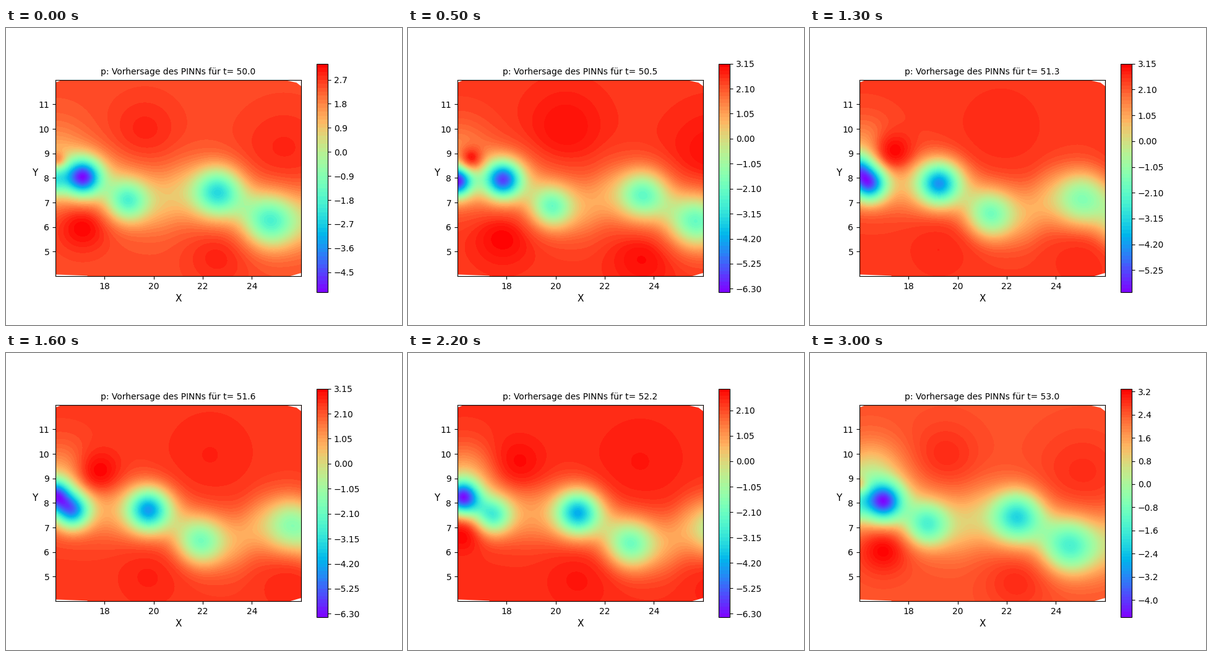
A matplotlib script for the animation above (3100 ms loop, 640 by 480 pixels).

```python
import matplotlib.pyplot as plt
import numpy as np
from matplotlib.animation import FuncAnimation
from matplotlib.patches import Polygon

FRAMES, STEP_MS = 31, 100
PERIOD = 3.1   # time between two vortices of the same row
LAG = 1.97     # delay of the lower row behind the upper one
BASE, KNEE = 2.45, 2.4

X, Y = np.meshgrid(np.linspace(16, 26, 220), np.linspace(4, 12, 176))

CORNERS = [
    [(16, 12), (16.24, 12), (16.14, 11.94), (16, 11.89)],
    [(25.3, 12), (25.82, 11.88), (26, 11.74), (26, 12)],
    [(16, 4), (16, 4.07), (17.3, 4.02), (17.3, 4)],
    [(25.55, 4), (26, 4.13), (26, 4)],
]


def step(s, mid, width):
    """Smooth rise from 0 to 1 around mid."""
    return 1 / (1 + np.exp((mid - s) / width))


def bell(d, width):
    return np.exp(-(d / width) ** 2)


def drift(s):
    """Slow start at the inlet, then a steady speed of 1.9."""
    return 15.76 + 1.14 * np.logaddexp(0, (s - 2.6) / .6)


# Each part is a tuple: x, y, height, size. The age tells how far it has moved.

def upper_vortex(age):
    height = -6.5 * step(age, 1.2, .15) * (1 - .62 * step(age, 5.7, .6))
    return drift(age), 8.66 - .2 * age, height, .38 + .045 * age


def lower_vortex(age):
    height = -7.2 * step(age, 1.2, .15) * (1 - .58 * step(age, 2.95, .25))
    y = 7.95 - 1.75 * step(age, 4.2, .85)
    return drift(age), y, height, .38 + .045 * age


def upper_high(age):
    x = 16.1 + .8 * age + .11 * age ** 2
    y = 9.4 - .7 * np.cos(.85 * (age - .2))
    return x, y, .35 + 2.1 * bell(age - .8, 1.1), .24 + .24 * np.clip(age, 0, 4.5)


def lower_high(age):
    y = 7.45 - 2.6 * step(age, 3.1, .7)
    height = step(age, 1.9, .15) * (.4 + 1.1 * bell(age - 2.3, .8))
    return drift(age), y, height, .1 + .2 * np.clip(age, 1, 4)


def inlet_low(t):
    return 16 + .15 * t, 9.2, -.7 - .3 * t, .9


def bump(x, y, height, size):
    return height * np.exp(-((X - x) ** 2 + (Y - y) ** 2) / (2 * size ** 2))


def wake(vortices):
    """Trough that meanders through the vortex centres."""
    total, weight = 0, 1e-9
    for x, y, height, _ in vortices:
        w = abs(height) * np.exp(-(X - x) ** 2 / 2)
        total, weight = total + w * y, weight + w
    return -1.5 * bell(Y - total / weight, 1.25)


def limits(t):
    """Deepest and highest pressure at time t."""
    lo = np.interp(t, [0, .5, .8, 1.3, 1.9, 2.4, 3],
                   [-5.2, -6.4, -6.75, -6.1, -6.75, -6.1, -4.55])
    hi = np.interp(t, [0, .5, 1.7, 2.2, 3], [3.25, 3.1, 3.1, 2.95, 3.25])
    return lo, hi


def pressure(t):
    ages = [t + k * PERIOD for k in range(-1, 4)]
    vortices = [upper_vortex(a) for a in ages] + [lower_vortex(a - LAG) for a in ages]
    highs = [upper_high(a) for a in ages] + [lower_high(a) for a in ages]
    parts = vortices + highs + [inlet_low(t)]
    p = BASE + wake(vortices) + sum(bump(*part) for part in parts)

    lo, hi = limits(t)
    p = np.where(p > KNEE, KNEE + (p - KNEE) * (hi - KNEE) / (p.max() - KNEE), p)
    return np.where(p < 0, p * lo / p.min(), p)


fig = plt.figure(figsize=(6.4, 4.8), dpi=100)


def draw(i):
    t = i * STEP_MS / 1000
    fig.clear()
    ax = fig.add_subplot()
    cs = ax.contourf(X, Y, pressure(t), 80, cmap="rainbow")
    for corner in CORNERS:
        ax.add_patch(Polygon(corner, fc="white", ec="none", zorder=2))
    ax.set_aspect("equal")
    ax.set_xlim(16.001, 25.999)
    ax.set_ylim(4.001, 11.999)
    ax.set_xlabel("X", fontsize=11)
    ax.set_ylabel("Y", fontsize=11, rotation=0)
    ax.set_title(f"p: Vorhersage des PINNs für t= {50 + t:.1f}", fontsize=10)
    fig.colorbar(cs, ax=ax)


anim = FuncAnimation(fig, draw, frames=FRAMES, interval=STEP_MS, repeat=True)
plt.show()
```
